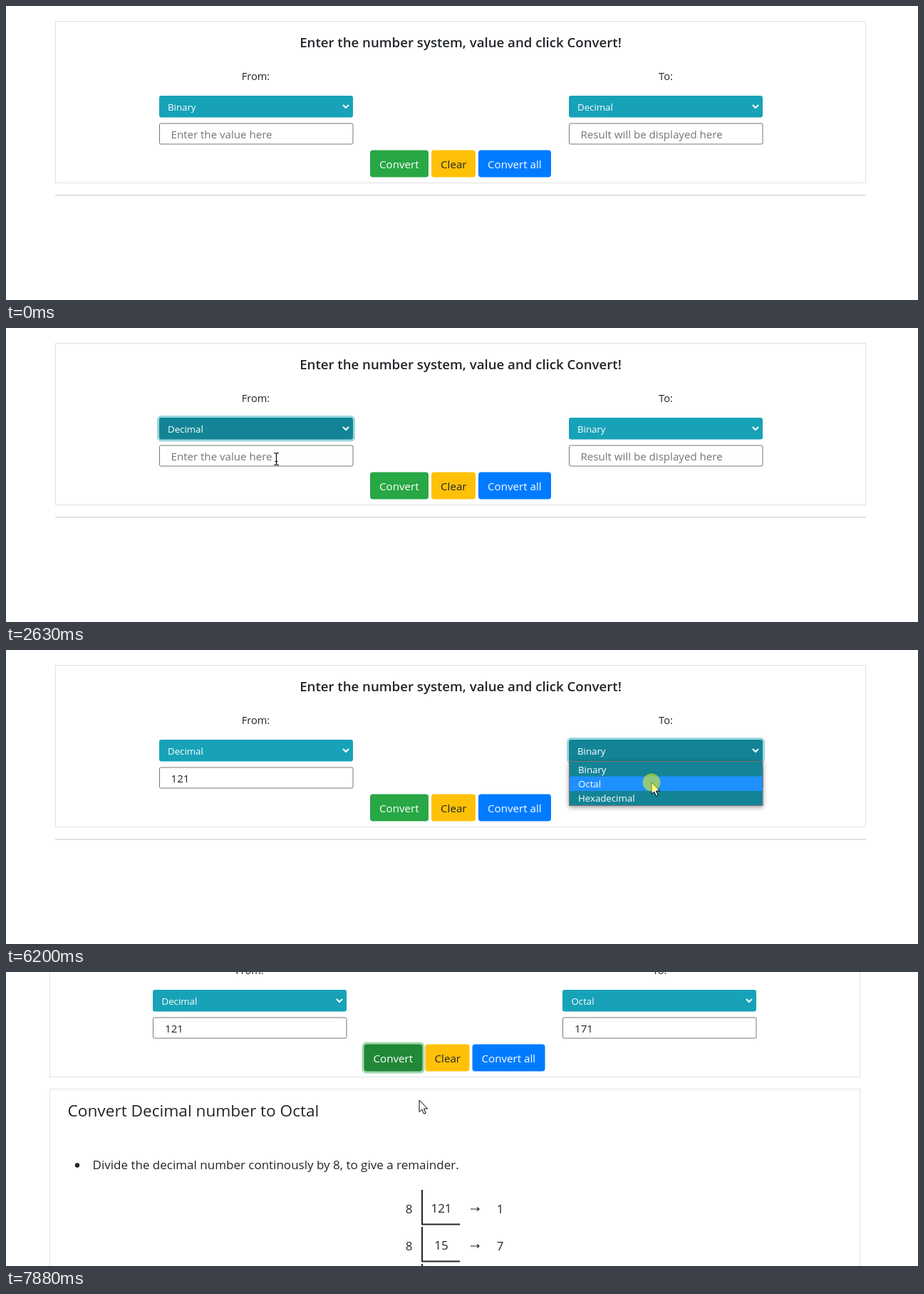
Write an HTML page that moves like this. It is 1280 px wide and 413 px high and loops after 8000 ms.

```html
<!DOCTYPE html>
<html lang="en">
<head>
<meta charset="utf-8">
<title>Number system converter</title>
<style>
  html, body { margin: 0; width: 100%; height: 100%; overflow: hidden; background: #fff; }
  svg { display: block; width: 100%; height: 100%; font-family: 'Open Sans', 'Noto Sans', sans-serif; }
  .list { filter: drop-shadow(0 2px 3px #0006); }
</style>
</head>
<body>
<svg id="stage" viewBox="0 0 1280 413"></svg>
<script>
const INK = '#212529', LOOP = 8000;
const stage = document.getElementById('stage');

// Mouse path: start time, end time, number of steps, destination
const moves = [
  [210, 1000, 8, 401, 194], [1100, 1330, 3, 387, 142], [1760, 1860, 2, 387, 157],
  [1980, 2080, 2, 380, 188], [2630, 2740, 2, 379, 179], [4070, 4400, 4, 954, 134],
  [5290, 5750, 5, 906, 186], [6420, 6980, 6, 568, 219], [7320, 7540, 3, 580, 180]
];

// Interface state: each entry changes some fields from its time on
const events = [
  [0, { from: 'Binary', to: 'Decimal', value: '', focus: '', open: '', click: false,
        caret: false, popup: false, result: false, scroll: 0 }],
  [1660, { focus: 'from', click: true }],
  [1760, { open: 'from', click: false }],
  [2310, { click: true }],
  [2410, { open: '', click: false, from: 'Decimal', to: 'Binary' }],
  [2740, { focus: 'input', click: true, caret: true }],
  [2850, { click: false }],
  [2960, { popup: true }],
  [3410, { value: '1' }],
  [3630, { value: '12', popup: false }],
  [3850, { value: '121' }],
  [4400, { caret: false }],
  [4950, { caret: true }],
  [5060, { focus: 'to', click: true, caret: false }],
  [5170, { open: 'to', click: false }],
  [6200, { click: true }],
  [6300, { open: '', click: false, to: 'Octal' }],
  [7080, { focus: 'convert', click: true }],
  [7200, { click: false, result: true }],
  [7760, { scroll: 50 }],
  [7880, { scroll: 101 }]
];

const text = (s, x, y, size, fill = INK, attrs = '') =>
  `<text x="${x}" y="${y}" font-size="${size}" fill="${fill}" ${attrs}>${s}</text>`;
const middle = 'text-anchor="middle"';
const rect = (x, y, w, h, fill, r = 0, attrs = '') =>
  `<rect x="${x}" y="${y}" width="${w}" height="${h}" rx="${r}" fill="${fill}" ${attrs}/>`;
const frame = (x, y, w, h, color, r = 0, line = 1) =>
  rect(x + line / 2, y + line / 2, w - line, h - line, '#fff', r, `stroke="${color}" stroke-width="${line}"`);
const ring = (x, y, w, h, color) => rect(x - 3, y - 3, w + 6, h + 6, color, 6, 'opacity=".5"');

function mouseAt(t) {
  let x = 1320, y = 430;
  for (const [start, end, n, tx, ty] of moves) {
    if (t < start) break;
    const gap = (end - start) / (n - 1);
    const p = Math.min(n, Math.floor((t - start) / gap + 1.001)) / n;
    x += (tx - x) * p;
    y += (ty - y) * p;
  }
  return { x, y };
}

function stateAt(t) {
  const s = {};
  for (const [time, change] of events) if (time <= t) Object.assign(s, change);
  return s;
}

function select(x, shift, label, dark, focused) {
  const left = x + Math.floor(shift);
  return (focused ? ring(left, 126, 272, 30.5, '#3ab0c3') : '') +
    rect(left, 126, 272, 30.5, dark ? '#138496' : '#17a2b8', 3) +
    text(label, x + 12 + shift, 146.5, 13.25, '#fff') +
    `<path d="M${left + 258} 139l4 4 4-4" fill="none" stroke="#fff" stroke-width="2"/>`;
}

function input(x, shift, value, hint, focused) {
  const left = x + Math.floor(shift);
  return frame(left, 164.5, 272.5, 30, focused ? '#101010' : '#767676', 2, focused ? 2 : 1) +
    text(value || hint, x + 16.5 + shift, 185.5, 15.1, value ? INK : '#757575');
}

const button = (x, w, label, fill, color = '#fff') =>
  rect(x, 202.5, w, 38, fill, 4) + text(label, x + 13, 227.5, 15.15, color);

function list(x, items, mouseY) {
  const active = Math.max(0, Math.min(items.length - 1, Math.floor((mouseY - 158) / 20)));
  return rect(x + .5, 156.5, 271.5, items.length * 20 + 2, '#138496', 0, 'class="list" stroke="#767676"') +
    rect(x + 1, 157.5 + active * 20, 270.5, 20.5, '#1e90ff') +
    items.map((s, i) => text(s, x + 13, 172.7 + i * 20, 13.25, '#fff')).join('');
}

function division(y, number, rest) {
  return text(8, 565.5, y + 32.5, 17, INK, middle) + text(number, 611, y + 31.5, 17, INK, middle) +
    text(rest, 693.5, y + 32.5, 17, INK, middle) +
    `<path d="M584 ${y}v48.5h53" fill="none" stroke="${INK}" stroke-width="2"/>` +
    `<path d="M652 ${y + 27}h12m-3-2.5l3 2.5-3 2.5" fill="none" stroke="${INK}" stroke-width="1.2"/>`;
}

function result() {
  let rows = '', n = 121;
  for (let y = 407; n; y += 52, n = n >> 3) rows += division(y, n, n % 8);
  return frame(61, 265, 1138, 600, '#dee2e6') +
    text('Convert Decimal number to Octal', 86.5, 304, 22.65) +
    `<circle cx="100" cy="372.5" r="3.2" fill="${INK}"/>` +
    text('Divide the decimal number continously by 8, to give a remainder.', 121.5, 378, 17.03) + rows;
}

const cursors = {
  arrow: '<path d="M0 0v16.5l3.8-3.5 2.6 6.2 2.7-1.1-2.6-6.1h5.2z" fill="#fff" stroke="#000" stroke-linejoin="round"/>',
  hand: '<path d="M-2 2a1.9 1.9 0 0 1 3.8 0v6.2l6 1.2q2.4.6 2.2 3l-.8 5-1.7 2.6v2.5h-8v-2l-5-6.5q-2-2.6-.3-3.6 1.4-.6 2.6.8l1.2 1.4z" fill="#fff" stroke="#000" stroke-width="1.1"/>' +
    '<path d="M1.8 8v4m2.7-3v3m2.7-2.5v3" fill="none" stroke="#000"/>',
  beam: '<path d="M-3.5-8q2.500 3.5 1 1-1 3.500-1M0-7V7M-3.500 8Q-.5 8 0 7 .5 8 3.500 8M-2 4h4" fill="none" stroke="#000" stroke-width="1.2"/>'
    .replace('M-3.5-8q2.500 3.5 1 1-1 3.500-1', 'M-3.5-8Q-.5-8 0-7 .5-8 3.5-8')
};
cursors.beam = '<path d="M-3.5-8Q-.5-8 0-7 .5-8 3.5-8M0-7V8M-3.5 9Q-.5 9 0 8 .5 9 3.5 9M-2 4h4" fill="none" stroke="#000" stroke-width="1.2"/>';

function scene(t) {
  const s = stateAt(t), m = mouseAt(t);
  const shift = s.result ? -8.5 : 0;
  const over = (x, y, w, h) => !s.open && m.x >= x + shift && m.x <= x + shift + w &&
    m.y + s.scroll >= y && m.y + s.scroll <= y + h;
  const hot = {
    from: over(215, 126, 272, 30), to: over(790, 126, 272, 30), convert: over(511, 203, 82, 37),
    clear: over(597, 203, 62, 37), all: over(663, 203, 102, 37)
  };
  const onInput = over(215, 165, 272, 29.5) || over(790, 165, 272, 29.5);
  const cursor = Object.values(hot).some(Boolean) ? 'hand' : onInput ? 'beam' : 'arrow';
  const dark = id => hot[id] || s.focus === id;
  const systems = ['Binary', 'Decimal', 'Octal', 'Hexadecimal'];

  let out = `<g transform="translate(0 ${-s.scroll})">` +
    frame(69 + Math.ceil(shift), 21, 1138, 228, '#dee2e6') +
    text('Enter the number system, value and click Convert!', 638 + shift, 57.5, 18.65, INK, middle + ' font-weight="600"') +
    text('From:', 350.5 + shift, 104, 14.6, INK, middle) + text('To:', 926 + shift, 104, 14.6, INK, middle) +
    input(215, shift, s.value, 'Enter the value here', s.focus === 'input') +
    input(790, shift, s.result ? '171' : '', 'Result will be displayed here') +
    select(215, shift, s.from, dark('from'), s.focus === 'from') +
    select(790, shift, s.to, dark('to'), s.focus === 'to') +
    (s.focus === 'convert' ? ring(511 + shift, 202.5, 82, 38, '#48b461') : '') +
    button(511 + shift, 82, 'Convert', dark('convert') ? '#218838' : '#28a745') +
    button(597 + shift, 62, 'Clear', hot.clear ? '#e0a800' : '#ffc107', INK) +
    button(663 + shift, 102, 'Convert all', hot.all ? '#0069d9' : '#007bff') +
    (s.result ? result() : rect(69, 265, 1138, 2, '#dee2e6'));

  if (s.caret) out += rect(232 + s.value.length * 8.65, 169, 1.2, 21, '#000');
  if (s.popup) {
    out += rect(214, 196, 273, 51, '#292a2d', 2, 'class="list"') +
      text('100', 223.5, 226.3, 11.4, '#e8eaed', 'font-weight="700"');
  }
  if (s.open === 'from') out += list(215, systems, m.y);
  if (s.open === 'to') out += list(790, systems.filter(n => n !== s.from), m.y);
  out += '</g>';

  if (t >= 210) out += `<g transform="translate(${m.x} ${m.y})">${cursors[cursor]}` +
    (s.click ? '<circle r="12.5" fill="#ff0" opacity=".5"/>' : '') + '</g>';
  return out;
}

let shown = '';
function tick() {
  const next = scene(performance.now() % LOOP);
  if (next !== shown) stage.innerHTML = shown = next;
  requestAnimationFrame(tick);
}
tick();
</script>
</body>
</html>
```
